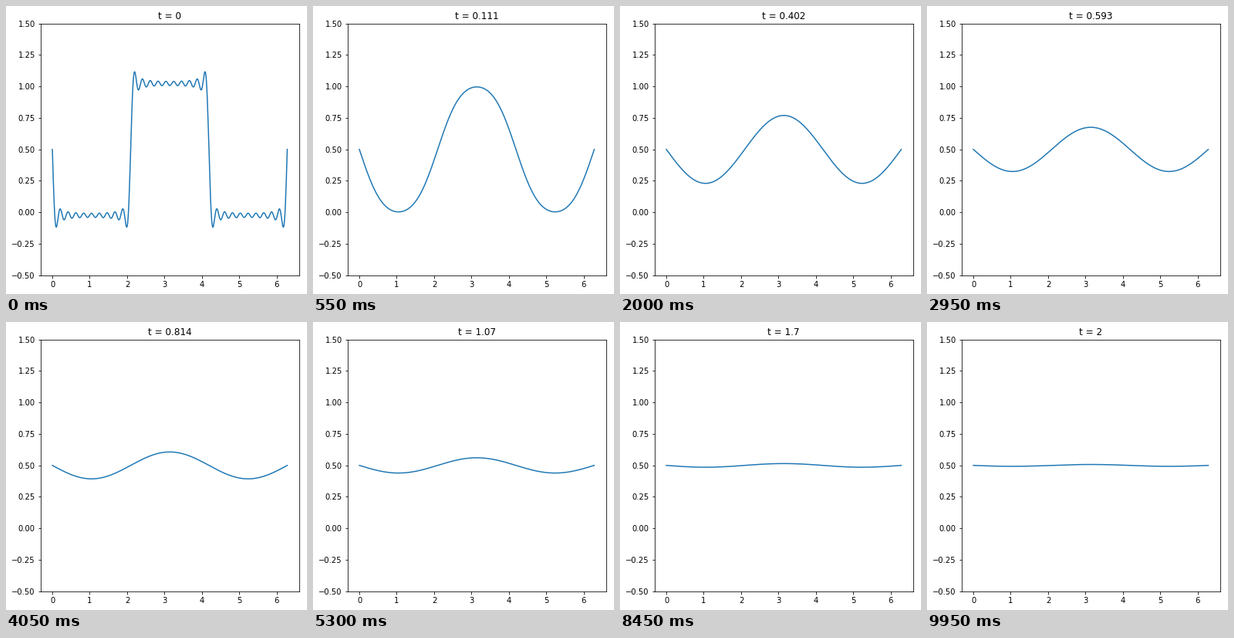
A matplotlib script that plays this animation: 390 px wide and 373 px high, repeating every 10 s.

```python
import numpy as np
import matplotlib.pyplot as plt
from matplotlib.animation import FuncAnimation

W, H, DPI = 390, 373, 72
LEFT, BOTTOM, AX_W, AX_H = 44.84, 24.2, 334.8, 326.16  # axes box in pixels
FRAMES, INTERVAL = 200, 50
T_END = 2.0
TERMS = 10

x = np.linspace(0, 2 * np.pi, 500)
times = np.linspace(0, T_END, FRAMES)
odd = np.arange(1, 2 * TERMS, 2)
waves = 1.5 * odd  # wave numbers of the sine modes
modes = np.sin(np.outer(waves, x))


def heat(t):
    """Truncated sine series of a step diffusing between ends held at 0.5."""
    coeffs = 2 / (3 * odd) * np.exp(-waves**2 * t)
    return 0.5 - coeffs @ modes


plt.rcParams.update({"font.family": "DejaVu Sans", "font.size": 10})
fig = plt.figure(figsize=(W / DPI, H / DPI), dpi=DPI, facecolor="white")
ax = fig.add_axes([LEFT / W, BOTTOM / H, AX_W / W, AX_H / H])
line, = ax.plot(x, heat(0), color="#1f77b4", lw=1.5)
ax.set_ylim(-0.5, 1.5)
title = ax.set_title("t = 0", fontsize=12)


def update(i):
    t = times[i]
    line.set_ydata(heat(t))
    title.set_text(f"t = {t:.3g}")
    return line, title


anim = FuncAnimation(fig, update, frames=FRAMES, interval=INTERVAL,
                     repeat=True, repeat_delay=0, blit=False)
plt.show()
```
